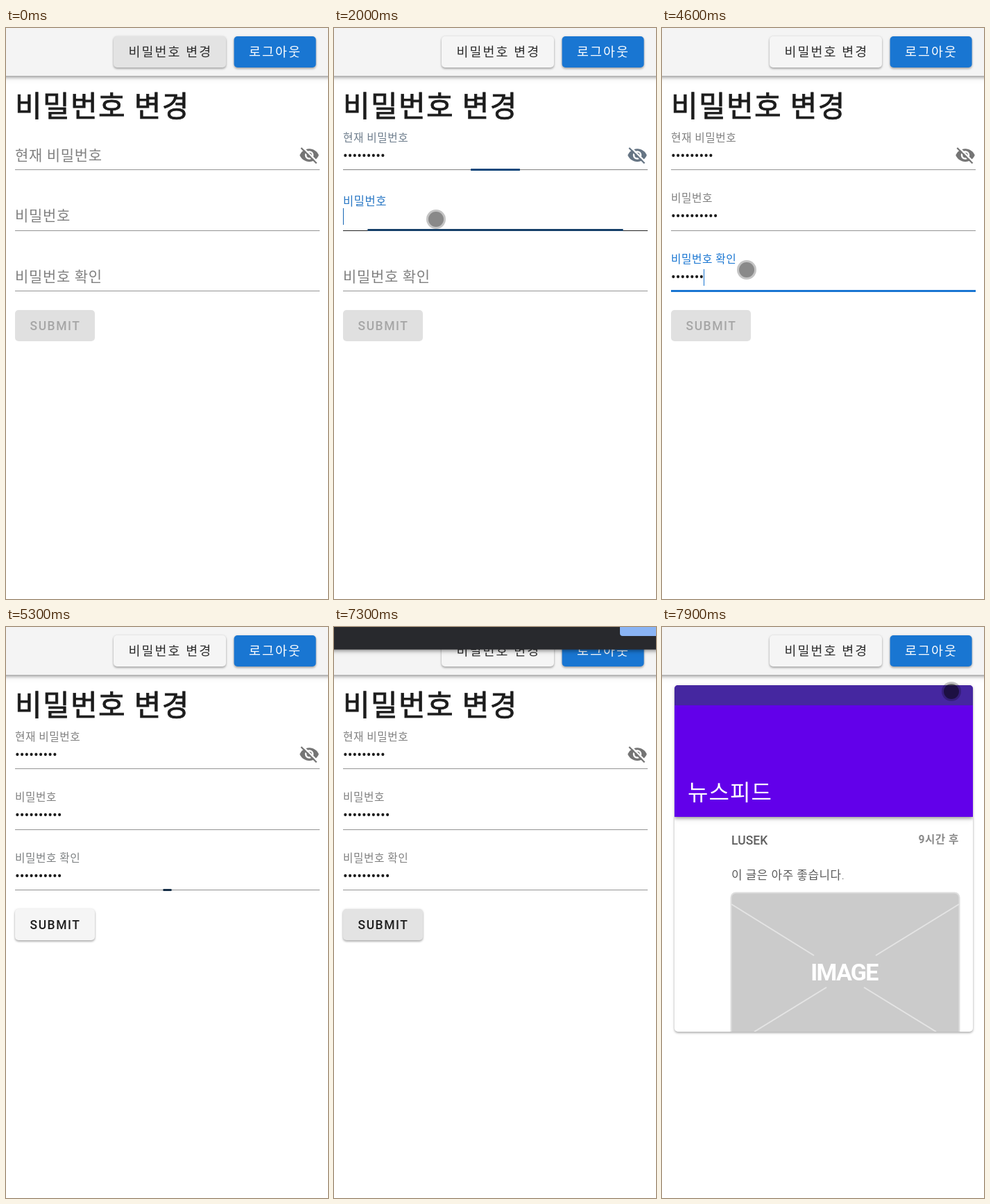
Write an HTML page that moves like this. It is 464 px wide and 824 px high and loops after 8 s.

```html
<!DOCTYPE html>
<html lang="ko">
<head>
<meta charset="utf-8">
<style>
  html, body { margin: 0; width: 100%; height: 100%; overflow: hidden; background: #fff; }
  svg { display: block; width: 464px; height: 824px; }
  text { font-family: Roboto, "Noto Sans CJK KR", "Noto Sans CJK", sans-serif; letter-spacing: .032em; white-space: pre; }
  .button { filter: drop-shadow(0 2px 1.5px rgba(0,0,0,.27)) drop-shadow(0 0 1.5px rgba(0,0,0,.12)); }
  .caption { letter-spacing: .115em; font-weight: 350; }
  .dots { letter-spacing: 0; }
  .title { stroke: #1c1c1c; stroke-width: .8px; }
  .bar { filter: drop-shadow(0 2px 2.5px rgba(0,0,0,.34)) drop-shadow(0 1px 4px rgba(0,0,0,.14)); }
  .card { filter: drop-shadow(0 2px 1.5px rgba(0,0,0,.25)) drop-shadow(0 0 2px rgba(0,0,0,.12)); }
  .picture { font-stretch: 75%; letter-spacing: -.05em; }
</style>
</head>
<body>
<svg id="stage" viewBox="0 0 464 824"></svg>
<script>
const stage = document.getElementById('stage');
const LOOP = 8000, BLUE = [25, 118, 210], DARK = [18, 18, 18], GRAY = [128, 128, 128];
const LEFT = 13, WIDTH = 439, FADE = 300;

const fields = [
  { label: '현재 비밀번호', y: 183, focus: 470, blur: 1865, hover: 470,
    keys: [700, 800, 900, 900, 1000, 1100, 1200, 1300, 1300] },
  { label: '비밀번호', y: 270.4, focus: 1865, blur: 3783, hover: 1700,
    keys: [2100, 2100, 2200, 2200, 2300, 2300, 3000, 3100, 3100, 3300] },
  { label: '비밀번호 확인', y: 358, focus: 3783, blur: 5082, hover: 3783,
    keys: [4000, 4000, 4100, 4300, 4300, 4300, 4600, 4700, 4700, 4900] }
];

// Each visit is a list of [time, x, y]; the pointer is hidden between visits.
const visits = [
  [[300, 190, 150], [500, 150, 184], [1400, 150, 184], [1800, 147, 276], [3400, 147, 276]],
  [[3800, 122, 349], [5000, 122, 349]],
  [[5700, 116, 445], [5900, 101, 442], [6300, 101, 442], [7100, 440, 20]],
  [[7400, 430, 40], [7600, 417, 93], [LOOP, 417, 93]]
];

const ramp = (t, start, length) => Math.min(1, Math.max(0, (t - start) / length));
const mix = (a, b, p) => `rgb(${a.map((v, i) => Math.round(v + (b[i] - v) * p))})`;
const gray = v => [v, v, v];

// cubic-bezier(.25, .8, .5, 1)
function ease(x) {
  let low = 0, high = 1, u = .5;
  for (let i = 0; i < 20; i++) {
    u = (low + high) / 2;
    const v = 1 - u;
    if (.75 * u * v * v + 1.5 * u * u * v + u ** 3 < x) low = u; else high = u;
  }
  return 1 - (1 - u) ** 3 - .6 * u * (1 - u) ** 2;
}

const rect = (x, y, w, h, fill, more = '') =>
  `<rect x="${x}" y="${y}" width="${w}" height="${h}" fill="${fill}" ${more}/>`;

// Text placed by the visual middle of its line.
const text = (x, middle, size, string, fill, more = '') =>
  `<text x="${x}" y="${middle + .38 * size}" font-size="${size}" fill="${fill}" ${more}>${string}</text>`;

const button = (x, y, w, fill, raised = true) =>
  rect(x, y, w, 45, fill, `rx="5" ${raised ? 'class="button"' : ''}`);

function header(t) {
  const held = 1 - ramp(t, 350, 250);
  return rect(-20, -20, 504, 89, '#f4f4f4', 'class="bar"')
    + button(155, 12, 162, mix(gray(245), gray(227), held))
    + text(176.5, 34.5, 18.4, '비밀번호 변경', '#2c2c2c', 'class="caption"')
    + button(328.6, 12, 118, '#1976d2')
    + text(350, 34.5, 18.4, '로그아웃', '#fff', 'class="caption"');
}

function eye(tint) {
  return `<g transform="translate(422 168.5) scale(1.25)" fill="${tint}">
    <path d="M1 12C2.73 7.61 7 4.5 12 4.5S21.27 7.61 23 12C21.27 16.39 17 19.5 12 19.5S2.73 16.39 1 12Z"/>
    <circle cx="12" cy="12" r="5" fill="#fff"/><circle cx="12" cy="12" r="3"/>
    <path d="M3.9 2.3L21.7 20.1" stroke="#fff" stroke-width="1.8"/>
    <path d="M2.6 3.6L20.4 21.4" stroke="${tint}" stroke-width="1.8"/></g>`;
}

function field(f, t, index) {
  const on = ramp(t, f.focus, FADE), off = ramp(t, f.blur, FADE);
  const rise = ease(on), spread = rise * (1 - ease(off));
  const base = f.y + 21.2;
  const strong = Math.max(spread, ramp(t, f.hover, 150) * (1 - ease(off)));
  const typed = f.keys.filter(k => k <= t);
  const size = 21 * (1 - .25 * rise);
  let out = rect(LEFT, Math.round(base), WIDTH, 1, `rgba(0,0,0,${.42 + .45 * strong})`);
  if (spread > .002) {
    const w = WIDTH * spread;
    out += rect(LEFT + (WIDTH - w) / 2, Math.floor(base) - 1, w, 3, mix(DARK, BLUE, on * (1 - off)));
  }
  out += text(LEFT, f.y - 25 * rise, size, f.label, mix(GRAY, BLUE, spread), 'font-weight="300"');
  out += `<text class="dots" x="${LEFT}" y="${Math.floor(f.y + 8.3)}" font-size="20" fill="#1c1c1c">${'•'.repeat(typed.length)}</text>`;
  if (t >= f.focus && t < f.blur) {
    const since = t - (typed.length ? typed[typed.length - 1] : f.focus);
    if (since % 1000 < 500)
      out += rect(LEFT + Math.round(6.67 * typed.length), Math.round(f.y - 10.5), 1, 24, mix(DARK, BLUE, spread));
  }
  return out + (index ? '' : eye(mix(gray(117), BLUE, spread)));
}

function submit(t) {
  const ready = ramp(t, 4900, 280), hover = ramp(t, 5700, 200);
  const shade = 224 + 21 * ready - 18 * hover;
  return button(13, 407, 115, `rgb(${gray(shade)})`, ready > 0)
    + `<text x="34.5" y="435.8" font-size="17.5" font-weight="500" style="letter-spacing:.0893em" fill="${mix(gray(166), gray(30), ready)}">SUBMIT</text>`;
}

function dialog(t) {
  if (t < 6100) return '';
  const focused = t < 6500;
  return rect(-20, -20, 504, 52.5, '#28292d', 'class="bar"')
    + rect(412, -10, 70, 23, focused ? '#7ba3e0' : '#8ab4f4', `rx="4" ${focused ? 'stroke="#5d82bd"' : ''}`);
}

const form = t => header(t)
  + text(13, 112, 42, '비밀번호 변경', '#1c1c1c', 'class="title"')
  + fields.map((f, i) => field(f, t, i)).join('') + submit(t);

const feed = t => header(t) + `
  <defs><clipPath id="edge"><rect x="18" y="84" width="430" height="500" rx="5"/></clipPath></defs>
  ${rect(18, 84, 430, 500, '#fff', 'rx="5" class="card"')}
  <g clip-path="url(#edge)">
    ${rect(18, 80, 430, 194, '#6200ea', 'class="bar"')}
    ${rect(18, 84, 430, 29, '#4527a0')}
    ${text(37, 238, 32, '뉴스피드', '#fff')}
    <text x="100" y="313.8" font-size="17.5" font-weight="500" style="letter-spacing:0" fill="#606060">LUSEK</text>
    ${text(369.5, 306.5, 15.6, '9시간 후', '#8a8a8a', 'font-weight="600"')}
    ${text(100, 358, 16.9, '이 글은 아주 좋습니다.', '#5c5c5c', 'font-weight="350"')}
    ${rect(99.5, 383.5, 329, 240, '#cbcbcb', 'rx="7" stroke="#dedede" stroke-width="2"')}
    <path d="M100 400L219 474M428 400L308 474M237 520L133 584M291 520L395 584" stroke="#e4e4e4" stroke-width="2"/>
    <text class="picture" x="262.5" y="510" font-size="34" font-weight="600" text-anchor="middle" fill="#fff">IMAGE</text>
  </g>`;

function pointer(t) {
  const path = visits.find(v => t >= v[0][0] && t <= v[v.length - 1][0]);
  if (!path) return '';
  const i = Math.max(1, path.findIndex(p => p[0] >= t));
  const [a, b] = [path[i - 1], path[i]];
  const p = ramp(t, a[0], b[0] - a[0]);
  const at = `cx="${a[1] + (b[1] - a[1]) * p}" cy="${a[2] + (b[2] - a[2]) * p}"`;
  const press = t >= 7800 ? .15 : 0;
  return `<circle ${at} r="14" fill="rgba(0,0,0,.23)"/><circle ${at} r="11" fill="rgba(0,0,0,${.3 + press})"/>`;
}

function draw(now) {
  const t = Math.floor((now + 8) / 100) * 100 % LOOP;
  stage.innerHTML = t < 7400 ? form(t) + pointer(t) + dialog(t) : feed(t) + pointer(t);
}

const start = performance.now();
function tick() {
  draw(performance.now() - start);
  requestAnimationFrame(tick);
}
tick();
</script>
</body>
</html>
```
